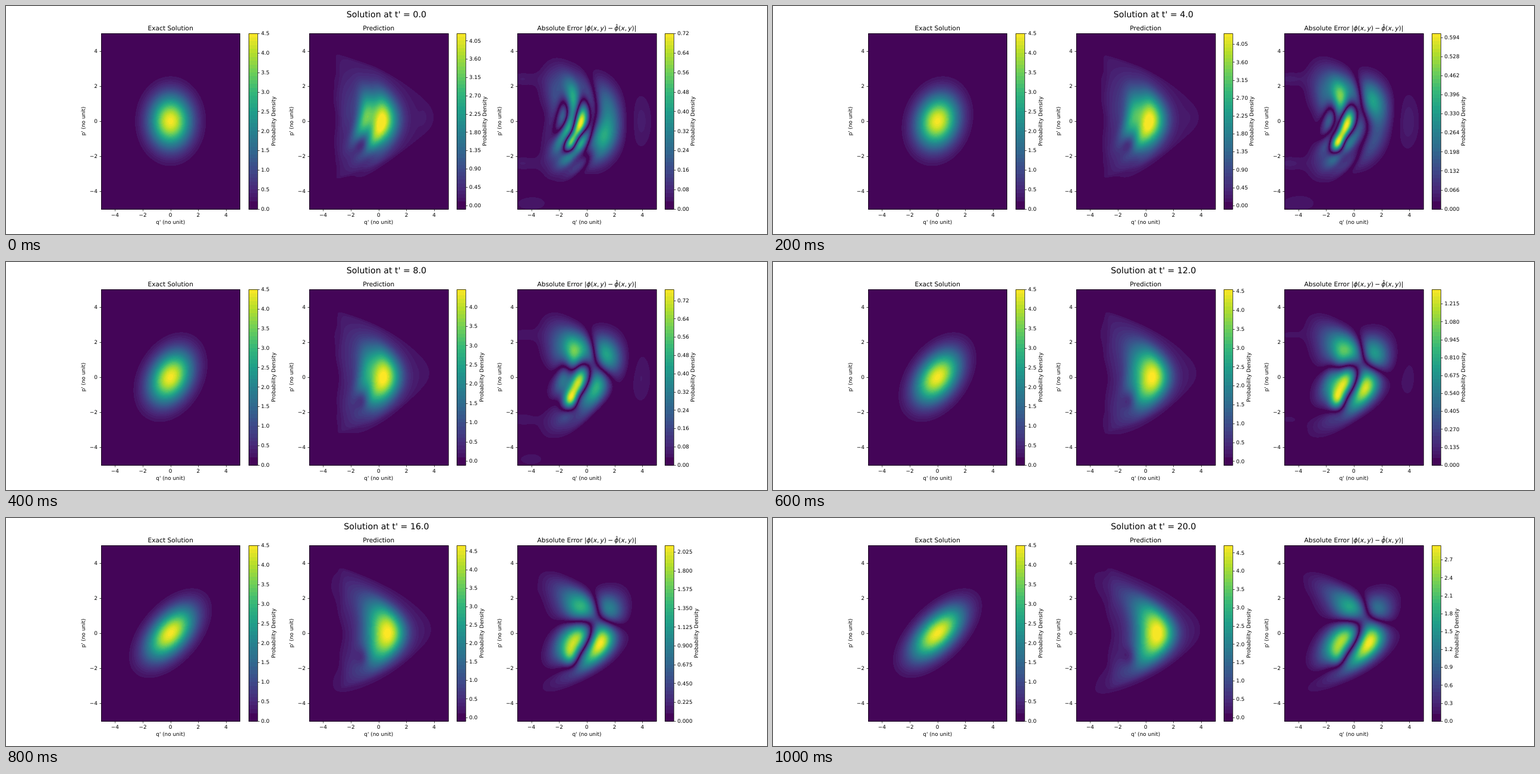
Recreate the animation shown at these times as an HTML page with a canvas. Size 1280x384 px, loop 1200 ms.

```html
<!DOCTYPE html>
<html lang="en">
<head>
<meta charset="utf-8">
<title>Density plots</title>
<style>
html, body { margin: 0; width: 100%; height: 100%; overflow: hidden; background: #fff; }
canvas, svg { position: absolute; left: 0; top: 0; width: 1280px; height: 384px; }
text { font: 8.89px "DejaVu Sans", sans-serif; text-rendering: geometricPrecision; white-space: pre; }
.title { font-size: 10.67px; }
.head { font-size: 14.22px; }
.math { font-style: oblique; }
path { fill: none; stroke: #000; stroke-width: .71; }
</style>
</head>
<body>
<canvas id="plot" width="1280" height="384"></canvas>
<svg viewBox="0 0 1280 384"><g id="axes"></g><g id="labels"></g></svg>
<script>
const TOP = 46.08, BOTTOM = 341.76, HEIGHT = BOTTOM - TOP, WIDTH = 233.4;
const BAR_OFFSET = 248, BAR = 14.78;
const UX = WIDTH / 10, UY = HEIGHT / 10;
const PANELS = [160, 510.1, 860.24];
const FRAMES = 6, HOLD = 200;
const ctx = document.getElementById('plot').getContext('2d');
const { exp, cos, floor, round, min, max, abs } = Math;
const lerp = (a, b, t) => a + (b - a) * t;
const bell = (x, y) => exp(-(x * x + y * y) / 2);
const rise = x => 1 / (1 + exp(-x));
const snap = v => floor(v + .5) + .5;

const VIRIDIS = ['440154', '482878', '3e4989', '31688e', '26828e', '1f9e89', '35b779', '6ece58', 'b5de2b', 'fde725']
  .map(hex => [0, 2, 4].map(i => parseInt(hex.slice(i, i + 2), 16)));
function viridis(t) {
  const s = min(max(t, 0), 1) * 9, i = min(8, floor(s));
  return VIRIDIS[i].map((c, k) => round(lerp(c, VIRIDIS[i + 1][k], s - i)));
}

// Five contour levels per tick; the two lowest share one colour
function makeScale(count, tick, below = 0) {
  const colors = Array.from({ length: Math.ceil(count) }, (_, i) => viridis(((i < 2 ? 0 : i) + .5) / count));
  const colorAt = level => colors[min(colors.length - 1, max(0, floor(level)))];
  return { count, tick, below, unit: tick / 5, colorAt, digits: String(tick).split('.')[1].length };
}
const EXACT_SCALE = makeScale(45, .5);
const PREDICTED = [48, 49, 45.5, 46.5, 47.5, 48].map((n, i) => makeScale(n, i < 2 ? .45 : .5, 1));
const ERROR_TICKS = [.08, .066, .08, .135, .225, .3];
const ERROR = [45, 46, 48, 49, 46.7, 49].map((n, i) => makeScale(n, ERROR_TICKS[i]));
const scalesAt = step => [EXACT_SCALE, PREDICTED[step], ERROR[step]];

// A round bell, sheared along q as time passes
function exact(q, p, t) {
  const u = q - .76 * t * p;
  return 4.47 * exp(-(u * u + p * p) / 2.1);
}

// A bell whose ridge bends into a crescent, with an early ripple on its left flank
function predicted(q, p, t) {
  const e = t ** 1.4;
  const u = q - lerp(.15, .85, e) + lerp(.15, .33, e) * p * p - .07 * (1 - t) * p;
  const side = u < 0 ? lerp(1.6, 1.5, e) : lerp(1.15, 1.2, e);
  const body = lerp(4.25, 4.7, e) * exp(-((u / side) ** 2) - (p / lerp(1.6, 1.75, e)) ** 2);
  const ripple = .7 * (1 - t) ** 2 * cos(3.8 * (q + .35) - 1.6 * p + .8 * p * p)
    * bell((q + .9) / .75, (p + .2) / 1.1);
  const dent = .75 * bell((q + 1.15) / .38, (p + 1.35) / .42);
  const faint = .07 * bell((q - 3.85) / .75, p / 1.4) + .08 * bell((q + 2.4) / .75, (p - 1.9) / 1)
    + .06 * bell((q + 4.7) / .9, (abs(p) - 2.4) / .35) + .05 * bell((q + 4) / 1.4, (p + 4.7) / .5);
  return body - ripple - dent + faint;
}

// The low, D-shaped plateau around the prediction
function skirt(q, p, t) {
  const right = 3.7 - .25 * Math.sin(Math.PI * t) - .53 * (p - .27) ** 2;
  const left = -2.95 + .4 * t + .13 * cos(2.6 * p);
  return .14 * rise((right - q) / .15) * rise((q - left) / .1);
}

function paintField(image, panel, scale, field) {
  const left = round(PANELS[panel]), top = round(TOP);
  for (let y = top; y <= round(BOTTOM); y++) {
    for (let x = left; x <= left + 233; x++) {
      const q = (x + .5 - PANELS[panel]) / UX - 5, p = 5 - (y + .5 - TOP) / UY;
      paint(image, x, y, scale.colorAt(field(q, p) / scale.unit + scale.below));
    }
  }
}

function paintBar(image, panel, scale) {
  const left = round(PANELS[panel] + BAR_OFFSET);
  for (let y = round(TOP); y <= round(BOTTOM); y++) {
    const color = scale.colorAt((BOTTOM - y - .5) / HEIGHT * scale.count);
    for (let x = left; x <= left + BAR; x++) paint(image, x, y, color);
  }
}

function paint(image, x, y, [r, g, b]) {
  const k = 4 * (y * image.width + x);
  image.data[k] = r;
  image.data[k + 1] = g;
  image.data[k + 2] = b;
  image.data[k + 3] = 255;
}

function render(step) {
  const image = ctx.createImageData(1280, 384), t = step / (FRAMES - 1), scales = scalesAt(step);
  const error = (q, p) => abs(exact(q, p, t) - predicted(q, p, t));
  let peak = 0;
  for (let q = -3; q < 3; q += .1) for (let p = -3; p < 3; p += .1) peak = max(peak, error(q, p));
  const gain = scales[2].count * scales[2].unit / peak;
  const fields = [
    (q, p) => exact(q, p, t),
    (q, p) => predicted(q, p, t) + skirt(q, p, t),
    (q, p) => gain * error(q, p)
  ];
  fields.forEach((field, i) => {
    paintField(image, i, scales[i], field);
    paintBar(image, i, scales[i]);
  });
  return image;
}

const text = (x, y, content, anchor = 'middle', extra = '') =>
  `<text x="${x}" y="${y}" text-anchor="${anchor}" ${extra}>${content}</text>`;
const upright = (x, content) =>
  text(0, 0, content, 'middle', `transform="translate(${round(x)} ${(TOP + BOTTOM) / 2}) rotate(-90)"`);
const line = d => `<path d="${d}"/>`;
const box = (x, w) => line(`M${snap(x)} ${snap(TOP)}H${snap(x + w)}V${snap(BOTTOM)}H${snap(x)}z`);

function axesMarkup() {
  const it = s => `<tspan class="math">${s}</tspan>`;
  const call = `${it('ϕ')}(${it('x')},\u2009${it('y')})`;
  const titles = ['Exact Solution', 'Prediction', `Absolute Error |${call}\u2009−\u2009${call}|`];
  let out = text(1027.5, 39, 'ˆ', 'middle', 'class="title"');
  PANELS.forEach((x, i) => {
    const mid = x + WIDTH / 2;
    out += box(x, WIDTH) + box(x + BAR_OFFSET, BAR);
    out += text(mid, 41, titles[i], 'middle', 'class="title"');
    out += text(mid, 367, "q' (no unit)") + upright(x - 27, "p' (no unit)");
    for (let v = -4; v <= 4; v += 2) {
      const label = v < 0 ? '−' + -v : v, tx = mid + v * UX, ty = TOP + HEIGHT / 2 - v * UY;
      out += line(`M${snap(tx)} ${snap(BOTTOM)}v3.1M${snap(x)} ${snap(ty)}h-3.1`);
      out += text(tx, 355, label) + text(x - 6.2, round(ty + 3.2), label, 'end');
    }
  });
  return out;
}

function barLabels(panel, { count, tick, digits, below }) {
  const x = PANELS[panel] + BAR_OFFSET + BAR;
  let out = upright(x + 15.6 + (.954 + .636 * digits) * 8.89, 'Probability Density');
  for (let n = 0; 5 * n + below <= count; n++) {
    const y = BOTTOM - (5 * n + below) / count * HEIGHT;
    out += line(`M${snap(x)} ${snap(y)}h3.1`);
    out += text(x + 6.2, round(y + 3.2), (n * tick).toFixed(digits), 'start');
  }
  return out;
}

const images = Array.from({ length: FRAMES }, (_, step) => render(step));
document.getElementById('axes').innerHTML = axesMarkup();

function draw(step) {
  ctx.putImageData(images[step], 0, 0);
  document.getElementById('labels').innerHTML =
    text(640, 19, `Solution at t' = ${(4 * step).toFixed(1)}`, 'middle', 'class="head"') +
    scalesAt(step).map((scale, i) => barLabels(i, scale)).join('');
}

let shown = -1;
const began = performance.now();
function tick() {
  const step = floor((performance.now() - began) / HOLD) % FRAMES;
  if (step !== shown) draw(shown = step);
  requestAnimationFrame(tick);
}
tick();
</script>
</body>
</html>
```
